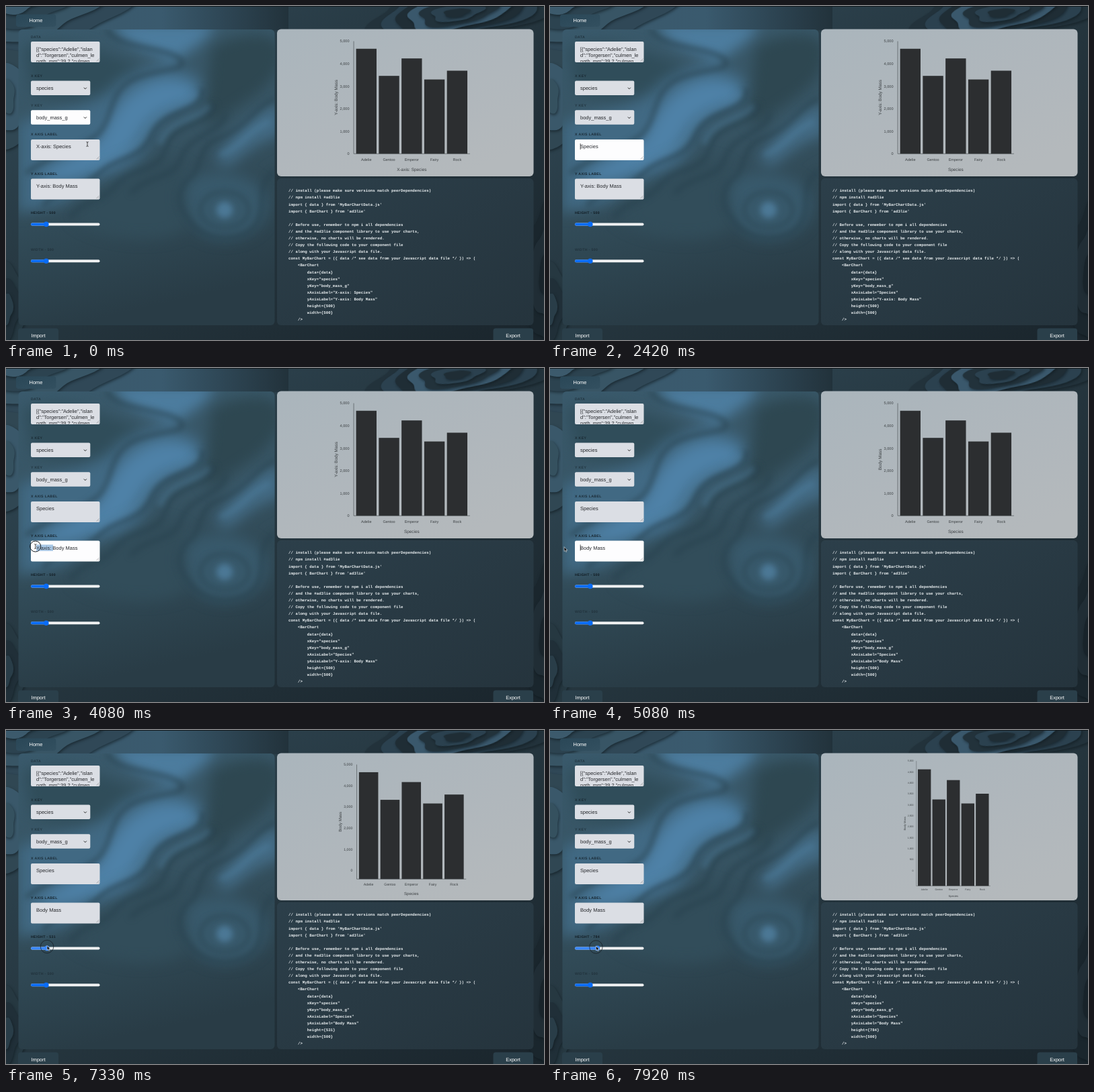
These frames come from a looping animation (800x498 px, 8000 ms). An HTML page:

```html
<!DOCTYPE html>
<html lang="en">
<head>
<meta charset="utf-8">
<title>Bar chart editor</title>
<style>
html, body { margin: 0; width: 100%; height: 100%; overflow: hidden; background: #24343d; }
svg { display: block; width: 100vw; height: 100vh; font-family: "Liberation Sans", Arial, sans-serif; }
filter { color-interpolation-filters: sRGB; }
text { white-space: pre; text-rendering: geometricPrecision; }
.label { font-size: 5.2px; font-weight: bold; letter-spacing: .35px; fill: #121c23; }
.field { font-size: 7.5px; fill: #26282c; }
.button { font-size: 7.5px; fill: #fff; text-anchor: middle; }
.code { font: bold 5.81px "Liberation Mono", monospace; fill: #e9eef0; }
.chart text { fill: #3c4043; text-anchor: middle; }
</style>
</head>
<body>
<svg id="stage" viewBox="0 0 800 498" preserveAspectRatio="none">
  <defs>
    <linearGradient id="page" x2="1" y2="1">
      <stop stop-color="#314a58"/><stop offset=".45" stop-color="#263740"/><stop offset="1" stop-color="#1a252c"/>
    </linearGradient>
    <linearGradient id="left" x2=".2" y2="1">
      <stop stop-color="#3a5a6c"/><stop offset=".45" stop-color="#375463"/>
      <stop offset=".75" stop-color="#2f4753"/><stop offset="1" stop-color="#293c46"/>
    </linearGradient>
    <linearGradient id="gray" x2=".7" y2="1">
      <stop stop-color="#aab5bc"/><stop offset=".6" stop-color="#b0b7bc"/><stop offset="1" stop-color="#b4b9bc"/>
    </linearGradient>
    <linearGradient id="dark" x2="1" y2="1">
      <stop stop-color="#2c3f4a"/><stop offset="1" stop-color="#25343d"/>
    </linearGradient>
    <linearGradient id="btn" x2="1" y2="1">
      <stop stop-color="#2a4757"/><stop offset="1" stop-color="#335060"/>
    </linearGradient>
    <linearGradient id="topStrip">
      <stop stop-color="#3a586a"/><stop offset=".55" stop-color="#3a5a6e"/><stop offset="1" stop-color="#22323b"/>
    </linearGradient>
    <filter id="soft" x="-20%" y="-20%" width="140%" height="140%"><feGaussianBlur stdDeviation="4"/></filter>
    <filter id="wide" x="-30%" y="-30%" width="160%" height="160%"><feGaussianBlur stdDeviation="10"/></filter>
    <filter id="shade" x="-10%" y="-10%" width="120%" height="130%">
      <feDropShadow dx="1" dy="2" stdDeviation="2" flood-color="#0c151b" flood-opacity=".6"/>
    </filter>
    <clipPath id="panel"><rect x="18.5" y="35" width="381" height="441" rx="6"/></clipPath>
    <clipPath id="dataBox"><rect x="37" y="53" width="102" height="30.4"/></clipPath>
  </defs>
  <rect width="800" height="498" fill="url(#page)"/>
  <rect width="420" height="36" fill="url(#topStrip)"/>
  <g id="paper"></g>
  <rect width="800" height="1" fill="#11181c"/>
  <g clip-path="url(#panel)">
    <rect x="18" y="35" width="382" height="441" fill="url(#left)"/>
    <g filter="url(#wide)">
      <path fill="#304d5a" d="M25 62C60 45 115 55 160 75C205 92 225 95 180 115C140 140 90 145 40 130Z"/>
      <path fill="#2e4751" d="M305 62C340 40 410 30 410 70C405 125 345 145 318 170C290 195 292 150 300 125Z"/>
      <path fill="#324d5a" d="M150 262C190 215 245 225 270 245C250 275 255 300 270 330C230 360 130 345 100 315Z"/>
      <path fill="#416983" d="M18 175C70 150 120 160 160 120C175 100 215 92 240 80L262 95C300 100 300 140 270 152C235 160 220 190 205 220C185 255 130 250 105 280C80 305 40 300 18 310Z"/>
      <path fill="#4c7c9e" d="M162 25H312C300 55 270 65 255 82C225 72 180 62 162 35Z"/>
      <path fill="#4e81a7" d="M190 128C230 98 283 108 286 133C283 152 235 148 213 173C195 190 195 215 165 230C130 250 85 265 50 258C75 228 122 225 142 195C155 170 165 147 190 128Z"/>
      <path fill="#446c86" d="M310 230C335 190 365 158 410 146V192C370 200 350 225 330 238Z"/>
      <path fill="#38596b" d="M270 262C300 235 385 250 388 290C395 335 330 365 290 338C270 320 262 290 270 262Z"/>
    </g>
    <g filter="url(#soft)" fill="none" stroke="#29424f" stroke-width="6" stroke-opacity=".7">
      <path d="M150 35C165 66 245 60 262 82C268 98 225 92 188 110C152 130 160 165 138 190C115 212 65 220 30 250"/>
      <path d="M292 122C296 162 237 150 218 190C202 232 165 222 135 252C110 278 80 270 55 298"/>
      <path d="M310 145C302 182 247 172 238 212C225 250 192 238 165 265C142 295 120 285 95 315"/>
      <path d="M328 160C318 192 270 192 260 228C245 262 215 248 185 280"/>
      <path d="M400 138C370 150 355 185 315 198C280 212 295 245 268 260C250 285 260 305 274 322C300 355 355 352 372 325C390 295 368 268 400 245"/>
      <ellipse cx="325" cy="304" rx="36" ry="27" stroke-width="4"/>
    </g>
    <g filter="url(#soft)" fill="none" stroke="#5182a4" stroke-width="6" stroke-opacity=".5">
      <path d="M282 128C280 148 228 145 207 184C194 218 160 213 128 244"/>
      <path d="M302 148C290 170 240 167 229 206"/>
      <path d="M392 172C362 184 350 210 318 222"/>
      <circle cx="325" cy="304" r="10" fill="#4b7794"/>
    </g>
  </g>
  <rect x="403" y="34.5" width="381.5" height="219.5" rx="6" fill="url(#gray)"/>
  <rect x="403" y="257" width="381.5" height="219" rx="6" fill="url(#dark)"/>
  <rect x="15" y="12.5" width="59.5" height="18.5" rx="4" fill="url(#btn)"/>
  <g fill="#2a3f4a">
    <rect x="18" y="480.5" width="60" height="22" rx="4"/>
    <rect x="724.5" y="480.5" width="59.5" height="22" rx="4"/>
  </g>
  <g class="button">
    <text x="44.5" y="24.2">Home</text><text x="48" y="494.2">Import</text><text x="754" y="494.2">Export</text>
  </g>
  <g id="scene"></g>
</svg>
<script>
const LOOP = 8000, FRAME = 1000 / 12;
const byId = id => document.getElementById(id);

// Layered paper contours behind the panels
function contour(cx, cy, rx, ry, seed, fill) {
  const points = Array.from({ length: 72 }, (_, i) => {
    const a = i * Math.PI / 36;
    const r = 1 + .1 * Math.sin(3 * a + seed) + .06 * Math.sin(5 * a - 2 * seed);
    return `${(cx + rx * r * Math.cos(a)).toFixed(1)},${(cy + ry * r * Math.sin(a)).toFixed(1)}`;
  });
  return `<polygon points="${points.join(' ')}" fill="${fill}" filter="url(#shade)"/>`;
}
function stack(cx, cy, rx, ry, count, seed, colors) {
  return Array.from({ length: count }, (_, i) => {
    const k = 1 - i / count;
    return contour(cx, cy, rx * k, ry * k, seed + i * .3, colors[i % colors.length]);
  }).join('');
}
byId('paper').innerHTML =
  stack(10, -10, 165, 80, 4, 2, ['#304857', '#385565', '#2c4350', '#3c5a6c']) +
  stack(0, 135, 40, 75, 3, 4, ['#304753', '#3a586a', '#35515f']) +
  `<g transform="rotate(-8 670 10)">${
    stack(670, 10, 135, 42, 7, .6, ['#22323b', '#2b414f', '#1f2d35', '#3a586c'])}</g>` +
  stack(805, 400, 35, 110, 3, 5, ['#1a262d', '#202d35', '#18232a']) +
  stack(0, 450, 30, 70, 3, 2, ['#263841', '#202f38', '#293d48']);

// Cursor: time, x, y
const CURSOR = [
  [0, 121, 206], [250, 115, 208], [670, 70, 211], [840, 70, 211], [1330, 50, 211], [1600, 33, 211],
  [2580, 35, 212], [3250, 70, 266], [3500, 70, 267], [4080, 44, 266], [4330, 23, 267],
  [5080, 21, 268], [5400, 28, 285], [5950, 58, 322], [6080, 59, 322], [7150, 59, 322],
  [7330, 61, 323], [7580, 64, 323], [7830, 66, 323], [7920, 68.5, 323.5]];
const PRESSED = [[750, 1620], [3500, 4380], [6900, 8000]];
const HIDDEN = [[2000, 2580], [4660, 5080]];
const HEIGHTS = [[0, 500], [7240, 531], [7410, 565], [7495, 606], [7580, 640],
  [7660, 665], [7745, 685], [7830, 702], [7910, 784]];
const BARS = { Adelie: .933, Gentoo: .692, Emperor: .847, Fairy: .66, Rock: .738 };

const within = (t, spans) => spans.some(([a, b]) => t >= a && t < b);

function cursorAt(t) {
  const i = CURSOR.findIndex(p => p[0] > t);
  if (i < 0) return CURSOR.at(-1).slice(1);
  const [t0, x0, y0] = CURSOR[i - 1], [t1, x1, y1] = CURSOR[i];
  const k = (t - t0) / (t1 - t0);
  return [x0 + (x1 - x0) * k, y0 + (y1 - y0) * k];
}

const escapeText = s => s.replace(/&/g, '&amp;').replace(/</g, '&lt;');
const text = (x, y, s, attrs = '') => `<text x="${x}" y="${y}" ${attrs}>${escapeText(s)}</text>`;
const rect = (x, y, w, h, fill, attrs = '') =>
  `<rect x="${x}" y="${y}" width="${w}" height="${h}" fill="${fill}" ${attrs}/>`;
const label = (y, s, opacity = 1) => text(37, y + 1.9, s, `class="label" opacity="${opacity}"`);
const boxFill = focused => focused ? '#fdfdfe' : '#dbdee4';

function area(y, focused, content) {
  return rect(37, y, 102.5, 31, boxFill(focused), 'rx="2"') + content +
    `<path d="M134.5 ${y + 29.5}l4-4M137 ${y + 29.5}l1.5-1.5" stroke="#777" stroke-width=".5"/>`;
}
function labelArea(y, s, focused, selectFrom, caret) {
  const mark = selectFrom < 70 ? rect(selectFrom, y + 6, 70 - selectFrom, 9.4, '#a9c8e6') : '';
  const bar = caret ? rect(44.8, y + 6, .7, 9, '#111') : '';
  return area(y, focused, mark + text(45, y + 13.2, s, 'class="field"') + bar);
}
function select(y, s, focused) {
  return rect(37, y, 88.3, 21.5, boxFill(focused), 'rx="2"') + text(45, y + 13.4, s, 'class="field"') +
    `<path d="M115.8 ${y + 10.2}l2 2 2-2" fill="none" stroke="#222" stroke-width="1"/>`;
}
function slider(y, value, blue) {
  const x = 41 + value * 94 / 2500;
  return rect(37, y - 2, 102.5, 4, '#f0f1f2', 'rx="2"') + rect(37, y - 2, x - 37, 4, blue, 'rx="2"') +
    `<circle cx="${x}" cy="${y}" r="3.8" fill="${blue}"/>`;
}

function chart(height, lastHeight, xLabel, yLabel) {
  const scale = 219 / height, inner = height - 117, bottom = 40 + inner;
  const tickSpan = lastHeight - 117, step = lastHeight > 683 ? 500 : 1000;
  let out = '';
  for (let v = 0; v <= 5000; v += step)
    out += text(60.5, 40 + tickSpan * (1 - v / 5000) + 4.4, v.toLocaleString('en-US'),
      'font-size="12.7" style="text-anchor:end"');
  Object.entries(BARS).forEach(([name, share], i) => {
    const x = 83.6 + i * 77.1;
    out += rect(x, bottom - share * inner, 69.3, share * inner, '#2c2e30') +
      text(x + 34.6, bottom + 23.5, name, 'font-size="12.7"');
  });
  out += `<path d="M75.5 40V${bottom}H470" fill="none" stroke="#42474a" stroke-width="1.4"/>` +
    text(272.5, bottom + 58, xLabel, 'font-size="14.7"') +
    text(0, 0, yLabel, `font-size="14.7" transform="translate(20 ${40 + inner / 2}) rotate(-90)"`);
  return `<g class="chart" transform="translate(${593.5 - 250 * scale} 35) scale(${scale})">${out}</g>`;
}

function code(height, xLabel, yLabel) {
  return `// install (please make sure versions match peerDependencies)
// npm install #ad3lie
import { data } from 'MyBarChartData.js'
import { BarChart } from 'ad3lie'

// Before use, remember to npm i all dependencies
// and the #ad3lie component library to use your charts,
// otherwise, no charts will be rendered.
// Copy the following code to your component file
// along with your Javascript data file.
const MyBarChart = ({ data /* see data from your Javascript data file */ }) => (
    <BarChart
        data={data}
        xKey="species"
        yKey="body_mass_g"
        xAxisLabel="${xLabel}"
        yAxisLabel="${yLabel}"
        height={${height}}
        width={500}
    />`.split('\n').map((line, i) => text(420, 277.3 + i * 10.1, line, 'class="code"')).join('');
}

function pointer(t, x, y) {
  if (within(t, HIDDEN)) return '';
  const overText = x > 37 && x < 139 && ((y > 199 && y < 230) || (y > 257 && y < 288));
  const onSlider = y > 300;
  const ring = within(t, PRESSED) ? `<circle cx="${x}" cy="${y}" r="${onSlider ? 9.7 : 8}" fill="none"
    stroke="#161b20" stroke-opacity="${onSlider ? .7 : 1}"/>` : '';
  const shape = overText
    ? '<path d="M-1.6-3.4Q0-3.4 0-2.2Q0-3.4 1.6-3.4M0-2.2V2.2M-1.6 3.4Q0 3.4 0 2.2Q0 3.4 1.6 3.4" fill="none" stroke="#222" stroke-width=".8"/>'
    : '<path d="M0-1.5V5.2L1.6 3.8 2.7 6.2 3.8 5.7 2.8 3.4H4.8Z" fill="#0b0d0f" stroke="#eef1f3" stroke-width=".6"/>';
  return ring + `<g transform="translate(${x} ${y})">${shape}</g>`;
}

function draw(t) {
  const [x, y] = cursorAt(t);
  const step = HEIGHTS.findLastIndex(h => h[0] <= t);
  const height = HEIGHTS[step][1], lastHeight = HEIGHTS[Math.max(0, step - 1)][1];
  const xCut = t >= 2000, yCut = t >= 4660;
  const xLabel = (xCut ? '' : 'X-axis: ') + 'Species';
  const yLabel = (yCut ? '' : 'Y-axis: ') + 'Body Mass';
  const xFocus = t >= 750 && t < 3500, yFocus = t >= 3500 && t < 6900;
  const blink = since => (t - since) % 1000 < 500;
  const edge = Math.max(45, x);
  const heightBlue = t >= 6900 ? '#3a88f8' : t >= 5950 ? '#0b58d4' : '#0a6cf5';

  byId('scene').innerHTML =
    label(46, 'DATA', .6) + label(104, 'X KEY', .7) + label(148, 'Y KEY', .55) +
    label(191, 'X AXIS LABEL', .8) + label(250, 'Y AXIS LABEL', .9) +
    label(308.5, `HEIGHT - ${height}`) + label(363, 'WIDTH - 500', .5) +
    area(53, false, '<g class="field" clip-path="url(#dataBox)">' +
      ['[{"species":"Adelie","islan', 'd":"Torgersen","culmen_le', 'ngth_mm":39.2,"culmen']
        .map((s, i) => text(45, 66.6 + i * 9.3, s)).join('') + '</g>') +
    select(111.5, 'species', false) + select(155.3, 'body_mass_g', t < 750) +
    labelArea(199, xLabel, xFocus, xFocus && !xCut ? edge : 70, xFocus && xCut && blink(2000)) +
    labelArea(257.4, yLabel, yFocus, yFocus && !yCut ? edge : 70, yFocus && yCut && blink(4900)) +
    slider(325.4, height, heightBlue) + slider(380.3, 500, '#0a6cf5') +
    chart(height, lastHeight, xLabel, yLabel) + code(height, xLabel, yLabel) + pointer(t, x, y);
}

const start = performance.now();
let shown = -1;
function tick() {
  const frame = Math.floor(((performance.now() - start) % LOOP + 5) / FRAME) % 96;
  if (frame !== shown) draw((shown = frame) * FRAME);
  requestAnimationFrame(tick);
}
tick();
</script>
</body>
</html>
```
